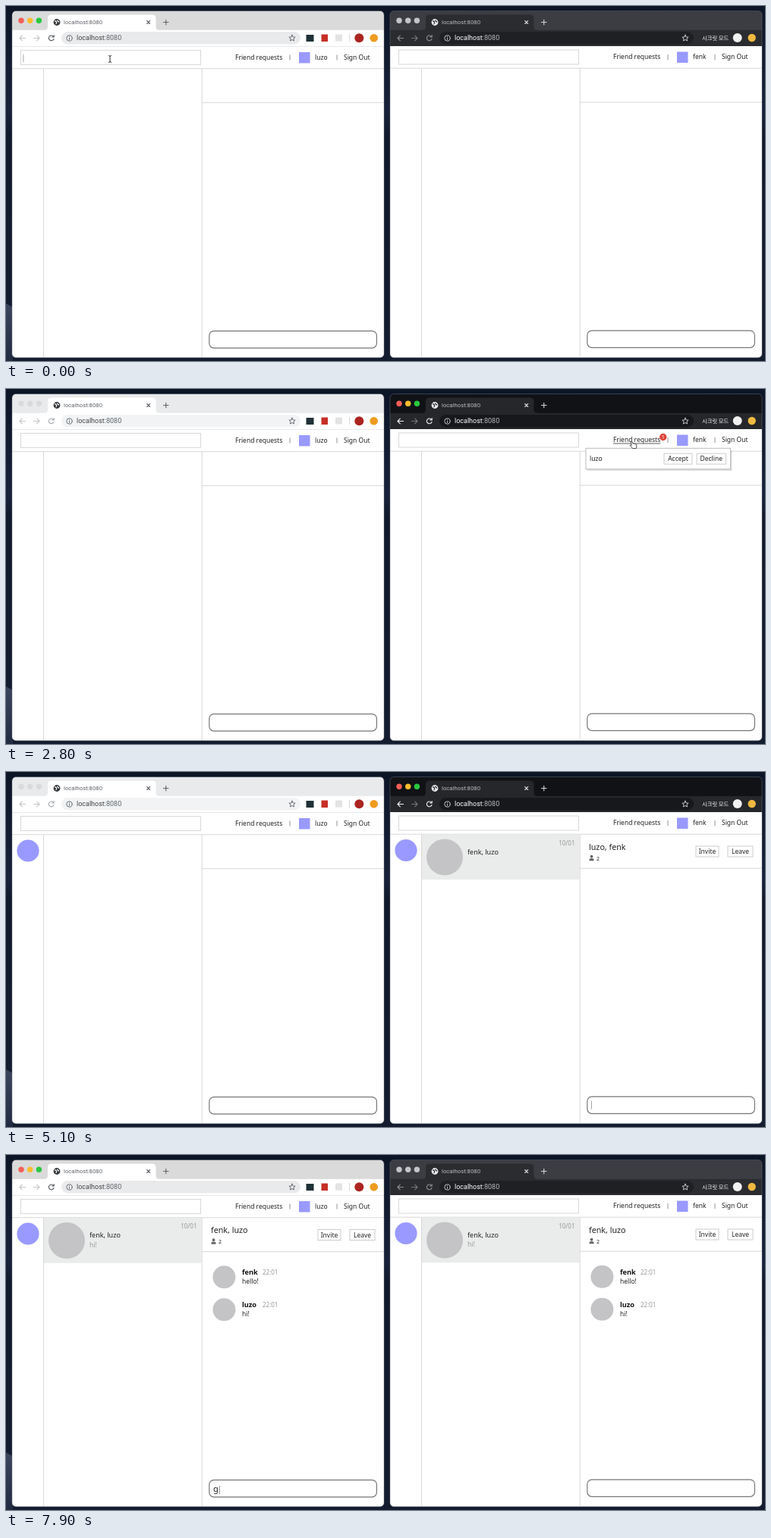
An HTML page that plays this animation: 1000 by 469 pixels, repeating every 8000 ms.

```html
<!DOCTYPE html>
<html lang="en">
<head>
<meta charset="utf-8">
<title>Chat in two windows</title>
<style>
html, body { margin: 0; width: 100%; height: 100%; overflow: hidden; background: #101829; }
svg { display: block; width: 100%; height: 100%; }
text { font: 8.5px "Noto Sans", sans-serif; fill: #222; white-space: pre; }
.ui { font-family: Roboto, sans-serif; }
.ko { font: 500 7.3px "Noto Sans CJK KR", "Noto Sans CJK", sans-serif; fill: #fff; }
.light { font-weight: 300; fill: #999; }
.mid { text-anchor: middle; }
.end { text-anchor: end; }
.caret { fill: #777; font-weight: 300; }
.line { stroke: #d8d8d8; fill: none; }
.btn { fill: #fff; stroke: #ccc; }
.icon { fill: none; stroke: var(--icon); stroke-width: 1.1; stroke-linecap: round; stroke-linejoin: round; }
.faint { stroke: var(--faint); }
.nav { stroke: var(--nav); }
.day { --strip: #e8eaeb; --bar: #fff; --pill: #f1f3f4; --ink: #5f6368; --url: #444; --icon: #5f6368; --globe: #333639; --faint: #c4c6c8; --nav: #a8abae; --l1: #dadada; --l2: #dadada; --l3: #dadada; }
.day.active { --strip: #dadada; --pill: #e9eaec; --nav: #55585c; --l1: #f35f57; --l2: #fbbd2e; --l3: #2ac840; }
.night { --strip: #3b3d42; --bar: #2b2c30; --pill: #1f2023; --ink: #b9bbbe; --url: #fff; --icon: #d4d6d8; --globe: #e8e9ea; --faint: #73767a; --nav: #8b8e92; --l1: #c2c4c7; --l2: #c2c4c7; --l3: #c2c4c7; }
.night.active { --strip: #101216; --bar: #26272b; --pill: #17181b; --nav: #f1f1f1; --l1: #f35f57; --l2: #fbbd2e; --l3: #2ac840; }
</style>
</head>
<body>
<svg id="stage" viewBox="0 0 1000 469" preserveAspectRatio="none"></svg>
<script>
const LOOP = 8000, STEP = 100;
const A = 'fenk', B = 'luzo';

// Moments of the story, in ms
const FOUND = 800, ADDED = 1600, FOCUS_RIGHT = 2600, POPUP = 2700, ACCEPTED = 3400,
  CARD = 3900, ROOM = 4600, HELLO = 5800, FOCUS_LEFT = 6400, HI = 7400;

const text = (x, y, s, cls = '', style = '') => `<text x="${x}" y="${y}" class="${cls}" style="${style}">${s}</text>`;
const rect = (x, y, w, h, attrs = '') => `<rect x="${x}" y="${y}" width="${w}" height="${h}" ${attrs}/>`;
const disc = (x, y, r, fill) => `<circle cx="${x}" cy="${y}" r="${r}" fill="${fill}"/>`;
const path = (d, cls, attrs = '') => `<path d="${d}" class="${cls}" ${attrs}/>`;
const show = (from, to, body) => `<g data-from="${from}" data-to="${to}">${body}</g>`;
const size = px => `font-size:${px}px`;

function button(x, y, w, label, color = '', border = '#ccc') {
  return rect(x + .5, y + .5, w, 14, `class="btn" style="stroke:${border}"`) +
    text(x + .5 + w / 2, y + 10.6, label, 'mid', color && `fill:${color}`);
}

// Shows growing prefixes of a word, one key at each time
function typing(x, y, word, times, end, style = '') {
  return times.map((t, i) => show(t, times[i + 1] ?? end,
    text(x, y, word.slice(0, i + 1) + '<tspan class="caret" dx="-1.5">|</tspan>', '', style))).join('');
}

const caret = (x, y, h, from, to) => show(from, to, rect(x, y, .9, h, 'fill="#999"'));

function browser(night) {
  const star = night ? 397 : 377;
  const light = (x, n) => disc(x, 19.3, 3.7, `var(--l${n})`);
  const extras = night
    ? text(419, 44.8, '시크릿 모드', 'ko') + disc(465.7, 42, 6, '#f1f1f1') + disc(484.7, 42, 5.2, '#f0b941')
    : rect(395.5, 38, 10, 9, 'fill="#1f3238"') + rect(415.5, 37.5, 8.5, 9.5, 'fill="#c62f27"') +
      rect(434, 37.5, 9, 9, 'fill="#e3e3e3"') + path('M452.5 37V47', 'line') +
      disc(465.3, 42.3, 6, '#ab2420') + disc(484.7, 42.3, 5.3, '#ee9b20');
  return rect(8, 6.5, 490, 40, 'rx="5" fill="var(--strip)"') +
    light(20, 1) + light(31.7, 2) + light(43.4, 3) +
    path('M50 32Q55 32 55 27V16Q55 11.5 60 11.5H192.5Q197.5 11.5 197.5 16V27Q197.5 32 202.5 32Z', '', 'fill="var(--bar)"') +
    rect(8, 31.8, 490, 22, 'fill="var(--bar)"') +
    disc(67, 21.5, 4.4, 'var(--globe)') +
    path('M64.2 20.2Q66 19.5 66.5 21.5T65.5 24M68 18.5Q67.5 20.5 70 21', '', 'fill="none" stroke="var(--bar)" stroke-width="1.3"') +
    text(76, 24.3, 'localhost:8080', 'ui', size(7.75) + ';fill:var(--ink)') +
    path('M185.7 19.5l4 4m0-4l-4 4', 'icon') +
    path('M207.5 21.5h6.5m-3.25-3.25v6.5', 'icon') +
    path('M25.5 42.5H18m3.3-3.3L18 42.5l3.3 3.3', night ? 'icon nav' : 'icon faint') +
    path('M36.5 42.5H44m-3.3-3.3l3.3 3.3l-3.3 3.3', 'icon faint') +
    path('M62.6 40.5A3.4 3.4 0 1 0 63 43.5M63.2 38.5v2.5h-2.6', 'icon nav') +
    rect(73, 34, star - 62, 16.5, 'rx="8.25" fill="var(--pill)"') +
    path('M87.2 42.5a3.7 3.7 0 1 0-7.4 0a3.7 3.7 0 1 0 7.4 0M83.5 42.3v2M83.5 40.5v.1', 'icon', 'style="stroke-width:.9"') +
    text(93, 45.4, 'localhost<tspan style="fill:var(--ink)">:8080</tspan>', 'ui', size(9) + ';fill:var(--url)') +
    path(`M${star} 38.2l1.2 2.7 2.9.3-2.2 1.9.7 2.9-2.6-1.5-2.6 1.5.7-2.9-2.2-1.9 2.9-.3z`, 'icon', 'style="stroke-width:.9"') +
    extras;
}

function pageFrame(user) {
  return rect(8, 53.5, 490, 412, 'fill="#fff"') +
    rect(19.5, 58.5, 237, 19, 'fill="#fff" class="line"') +
    path('M8 82.7H498M49.5 83V464M258.2 83V464M258 127.7H498', 'line') +
    text(302, 70.6, 'Friend requests') + path('M374 64.5v7M436 64.5v7', '', 'stroke="#777" stroke-width=".8"') +
    rect(386, 61, 14.5, 14.5, 'fill="#99f"') + text(407, 70.6, user) + text(445, 70.6, 'Sign Out') +
    rect(267.8, 429.4, 220.6, 22.4, 'rx="6" fill="#fff" stroke="#777" stroke-width="1.2"');
}

function chat(who, said, y) {
  return disc(287.4, y, 15, '#c4c4c6') + text(311, y - 3.2, who, '', size(9.2) + ';font-weight:600;fill:#111') +
    text(338, y - 3, '22:01', 'light', size(8)) + text(311, y + 9, said);
}

function roomItem(from, picked, last) {
  return show(picked, LOOP, rect(50, 83.2, 208, 59.5, 'fill="#eaebeb"')) +
    show(from, LOOP, disc(80, 113, 24, '#c4c4c6') + text(110, 109.3, `${A}, ${B}`, '', size(9)) +
      text(251.5, 97, '10/01', 'light end', size(8))) +
    last.map(([a, b, s]) => show(a, b, text(110, 121.5, s, 'light'))).join('');
}

const roomTools = path('M270.5 117.7v-1.5q0-1.7 3-1.7t3 1.7v1.5z', '', 'fill="#666"') + disc(273.5, 112.2, 1.9, '#666') +
  text(280, 117.2, '2', '', size(7)) + button(410.5, 98, 30, 'Invite') + button(452.5, 98, 33, 'Leave');
const title = s => text(270, 103.3, s, '', size(10.7));
const friend = show(ACCEPTED, LOOP, disc(29, 104, 14.6, '#99f'));

function leftPage() {
  return pageFrame(B) + friend +
    caret(22.5, 64, 10, 0, 300) + caret(22.5, 64, 10, ADDED, 2500) +
    typing(22.5, 72, A, [300, 400, 500, 700], ADDED, size(9)) +
    show(FOUND, ADDED, rect(19.5, 78, 237.5, 27.5, 'fill="#fff" stroke="#ccc"') +
      text(24.5, 94, A) + text(47, 94, `${A}@plovents.com`, 'light') + button(226.5, 84, 25, 'Add')) +
    roomItem(HELLO, FOCUS_LEFT, [[HELLO, HI, 'hello!'], [HI, LOOP, 'hi!']]) +
    show(FOCUS_LEFT, LOOP, title(`${A}, ${B}`) + roomTools + chat(A, 'hello!', 161.3)) +
    show(HI, LOOP, chat(B, 'hi!', 204.3)) +
    typing(273, 445, 'hi!', [7100, 7200, 7300], HI, size(11)) +
    caret(273, 435, 11, 6900, 7100) + caret(273, 435, 11, HI, 7900) +
    typing(273, 445, 'g', [7900], LOOP, size(11));
}

function rightPage() {
  return pageFrame(A) + friend +
    show(1800, ACCEPTED, disc(367.8, 64, 4.7, '#e0443a') + text(367.8, 66.6, '1', 'mid', size(7) + ';fill:#fff')) +
    show(POPUP, 3100, path('M302 72.5h62.5', '', 'stroke="#333" stroke-width=".8"')) +
    show(POPUP, ACCEPTED, rect(267.5, 81.5, 191, 27, 'fill="#000" opacity=".13"') +
      rect(266, 78.8, 190.5, 27.5, 'fill="#fff" stroke="#bbb"') + text(271, 95, B) +
      button(368.5, 85.2, 37, 'Accept') + button(411.5, 85.2, 38.5, 'Decline')) +
    roomItem(ROOM, ROOM, [[HELLO, HI, 'hello!'], [HI, LOOP, 'hi!']]) +
    show(ROOM, LOOP, roomTools) + show(ROOM, HI, title(`${B}, ${A}`)) + show(HI, LOOP, title(`${A}, ${B}`)) +
    show(CARD, ROOM, path('M54.5 99.5L47 104.5L54.5 109.5', '', 'fill="#fff" stroke="#ddd"') +
      rect(54.3, 81, 118, 47, 'rx="6" fill="#fff" stroke="#ccc"') +
      path('M54.3 96V87q0-6 6-6h106q6 0 6 6v9z', '', 'fill="#e6e7e9" stroke="#ccc"') +
      text(113, 91, B, 'mid') + button(64, 104.5, 45, 'Message') + button(121, 104.5, 40.5, 'Remove', '#d9534f', '#e6a3a0')) +
    caret(273, 435, 11, 5100, 5200) +
    typing(273, 445, 'hello!', [5200, 5300, 5400, 5500, 5600, 5700], HELLO, size(11)) +
    caret(273, 435, 11, HELLO, 6100) +
    show(HELLO, LOOP, chat(A, 'hello!', 161.3)) + show(HI, LOOP, chat(B, 'hi!', 204.3));
}

const desktop = `<defs>
  <linearGradient id="sky" x2="0" y2="1"><stop stop-color="#0c1526"/><stop offset=".3" stop-color="#18223a"/>
  <stop offset=".36" stop-color="#111a2c"/><stop offset="1" stop-color="#141d30"/></linearGradient>
  <linearGradient id="dune" x2="0" y2="1"><stop stop-color="#3a465e"/><stop offset="1" stop-color="#212b41"/></linearGradient>
  <clipPath id="frame"><rect x="8" y="6.5" width="490" height="458" rx="5"/></clipPath></defs>
  <rect width="1000" height="469" fill="url(#sky)"/><path d="M0 393L9 398V469H0Z" fill="url(#dune)"/>`;

const pane = (id, cls, x, dy, body) => `<g id="${id}" class="${cls}" transform="translate(${x})"><g clip-path="url(#frame)">` +
  `${browser(cls === 'night')}<g transform="translate(0 ${dy})">${body}</g></g>` +
  rect(8, 6.5, 490, 458, 'rx="5" fill="none" stroke="#7a7f89" stroke-opacity=".5" stroke-width=".8"') + '</g>';

const pointers = {
  beam: path('M-2-4.5q2 0 2 1.5q0-1.5 2-1.5M0-3v6M-2 4.5q2 0 2-1.5q0 1.5 2 1.5', '', 'fill="none" stroke="#333" stroke-width="1"'),
  arrow: path('M0 0v8.5l2-1.9 1.4 3.1 1.5-.7-1.4-3h2.7z', '', 'fill="#111" stroke="#fff" stroke-width=".7"'),
  hand: path('M-1.5 0q.9-.7 1.5.4l1 2.8q1-.8 1.7.3q1-.6 1.6.4q1-.3 1.3.9q.7 2.3-.4 4.8h-4.4l-3.5-3.7q-.2-1.2 1.2-.8l.6.4z', '', 'fill="#fff" stroke="#222" stroke-width=".8"')
};

const stage = document.getElementById('stage');
stage.innerHTML = desktop + pane('left', 'day', 0, 0, leftPage()) + pane('right', 'night', 498, -.5, rightPage()) +
  '<g id="pointer">' + Object.entries(pointers).map(([k, p]) => `<g data-kind="${k}">${p}</g>`).join('') + '</g>';

// time, x, y, shape from then on ('' hides it)
const track = [
  [0, 137, 70, 'beam'], [100, 137, 70, 'beam'], [500, 147, 69, 'beam'], [1000, 147, 69, 'arrow'],
  [1400, 238, 90, 'hand'], [1600, 238, 90, 'arrow'], [2000, 470, 88, ''], [2200, 520, 86, 'arrow'],
  [2600, 825, 69, 'hand'], [2900, 825, 69, 'arrow'], [3200, 885, 91, 'hand'], [3500, 885, 91, 'arrow'],
  [3900, 526, 104, 'hand'], [4200, 526, 104, 'arrow'], [4500, 584, 110, 'hand'], [4700, 584, 110, 'arrow'],
  [5100, 860, 440, ''], [5800, 860, 440, 'arrow'], [6200, 135.5, 119, 'arrow'], [6500, 135.5, 119, 'arrow'],
  [6900, 360, 440, 'beam'], [7100, 360, 440, ''], [LOOP, 360, 440, '']
];

const timed = [...stage.querySelectorAll('[data-from]')];
const kinds = [...stage.querySelectorAll('[data-kind]')];
const pointer = document.getElementById('pointer');
const left = document.getElementById('left'), right = document.getElementById('right');
const see = (el, on) => { el.style.display = on ? '' : 'none'; };

function draw(t) {
  for (const el of timed) see(el, t >= +el.dataset.from && t < +el.dataset.to);
  const onRight = t >= FOCUS_RIGHT && t < FOCUS_LEFT;
  left.classList.toggle('active', !onRight);
  right.classList.toggle('active', onRight);

  const i = track.findIndex(k => k[0] > t);
  const [t0, x0, y0, kind] = track[i - 1], [t1, x1, y1] = track[i];
  const p = (t - t0) / (t1 - t0), e = p * p * (3 - 2 * p);
  pointer.setAttribute('transform', `translate(${x0 + (x1 - x0) * e} ${y0 + (y1 - y0) * e})`);
  for (const el of kinds) see(el, el.dataset.kind === kind);
}

const start = performance.now();
function tick() {
  const t = (performance.now() - start) % LOOP;
  draw(Math.floor(t / STEP) * STEP);
  requestAnimationFrame(tick);
}
tick();
</script>
</body>
</html>
```
